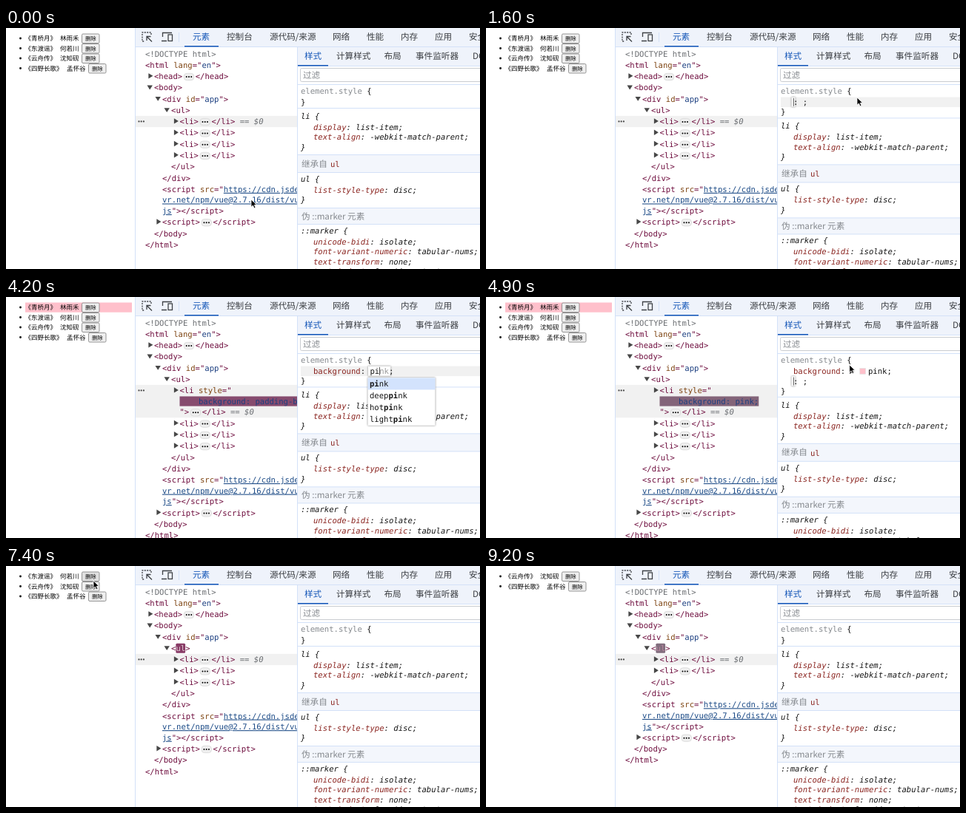
An HTML page for the animation above (9.3 s loop, 640 by 326 pixels).

```html
<!DOCTYPE html>
<html lang="zh">
<head>
<meta charset="utf-8">
<title>List deletion in the inspector</title>
<style>
  html, body { margin: 0; width: 100%; height: 100%; overflow: hidden; background: #fff; }
  svg { display: block; width: 640px; height: 326px; }
  text { white-space: pre; fill: #161616; text-rendering: geometricPrecision;
         font: 10.58px "DejaVu Sans Mono", monospace; }
  .ui { font: 11.6px "Noto Sans CJK SC", "Noto Sans CJK", sans-serif; fill: #3a3d41; }
  .page { font: 8.5px "Noto Sans CJK SC", "Noto Sans CJK", sans-serif; fill: #000; }
  .btn { font-size: 7.4px; }
  .blue { fill: #1557b8; }
  .muted { fill: #85898e; }
  .tag { fill: #6d0b3c; }
  .attr { fill: #7d4310; }
  .val { fill: #1c3f80; }
  .link { fill: #1b4a86; text-decoration: underline; }
  .doc { fill: #6a6d71; }
  .prop { fill: #8b2520; }
  .ghost { fill: #9a9a9a; }
  .it { font-style: italic; }
  .bold { font-weight: bold; }
  .rule { stroke: #d3e1f8; }
  .bar { fill: #f3f6fc; }
  .box { fill: #fff; filter: drop-shadow(0 0 1px #777); }
  .band { fill: #f1f1f1; }
</style>
</head>
<body>
<svg viewBox="0 0 640 326" xml:space="preserve">
  <defs>
    <clipPath id="left"><rect x="175" y="26" width="218" height="300"/></clipPath>
    <clipPath id="right"><rect x="394" y="76" width="246" height="250"/></clipPath>
  </defs>
  <g id="page"></g>
  <g id="tree" clip-path="url(#left)"></g>
  <g id="styles" clip-path="url(#right)"></g>
  <g id="chrome"></g>
  <g id="popup"></g>
  <path id="pointer" d="M0 0V10.2L2.4 8L4.1 11.8L5.9 11L4.3 7.3H7.5Z" fill="#000" stroke="#fff" stroke-width=".8"/>
</svg>
<script>
const LOOP = 9300, STEP = 100, CW = 6.37, ROW = 15.27, WRAP = 14.6;
const DELETES = [7100, 8500];
const books = [['青桥月', '林雨禾'], ['东渡谣', '何若川'], ['云舟传', '沈知砚'], ['四野长歌', '孟怀谷']];
const nameHints = ['backdrop-filter', 'backface-visibility', 'background',
  ...['attachment', 'blend-mode', 'clip', 'color', 'image', 'origin', 'position',
    'position-x', 'position-y', 'repeat', 'size'].map(s => 'background-' + s)];
const pHints = ['padding-box', 'palegoldenrod', 'palegreen', 'paleturquoise', 'palevioletred',
  'papayawhip', 'peachpuff', 'peru', 'pink', 'plum', 'powderblue', 'purple'];
const pinkHints = ['pink', 'deeppink', 'hotpink', 'lightpink'];

const $ = id => document.getElementById(id);
const esc = s => s.replace(/&/g, '&amp;').replace(/</g, '&lt;');
const span = (c, s) => `<tspan class="${c}">${esc(s)}</tspan>`;
// y is the visual middle of the line
const text = (x, y, body, c = '', d = 3.8) => `<text x="${x}" y="${y + d}" class="${c}">${body}</text>`;
const ui = (x, y, s, c = '') => text(x, y, s, 'ui ' + c, 4.3);
const rect = (x, y, w, h, rest) => `<rect x="${x}" y="${y}" width="${w}" height="${h}" ${rest}/>`;
const line = (x1, y1, x2, y2) => `<path class="rule" d="M${x1} ${y1}L${x2} ${y2}"/>`;
const mix = (a, b, p) => a.map((v, i) => Math.round(v + (b[i] - v) * p));
const latest = (t, steps) => steps.reduce((cur, [at, v]) => t >= at ? v : cur, '');

function drawChrome() {
  let out = rect(175, 0, 465, 25, 'fill="#eff3fb"') + rect(394, 25, 246, 26, 'fill="#eff3fb"')
    + rect(394, 51, 246, 25, 'fill="#fff"')
    + line(175, 25.5, 640, 25.5) + line(394, 51.5, 640, 51.5) + line(394, 76.5, 640, 76.5)
    + line(174.5, 0, 174.5, 326) + line(393.5, 25, 393.5, 326) + line(233.5, 6, 233.5, 19)
    + rect(241, 24, 46, 1.5, 'fill="#1557b8"') + rect(394, 50, 41, 1.5, 'fill="#1557b8"')
    + rect(397.5, 54.5, 260, 18, 'rx="2" fill="#fff" stroke="#c9ccd1"') + ui(401, 63.5, '过滤', 'muted');
  [[252, '元素', 'blue'], [298, '控制台'], [356, '源代码/来源'], [441, '网络'], [487, '性能'],
    [533, '内存'], [579, '应用'], [625, '安全']].forEach(([x, s, c]) => out += ui(x, 12, s, c));
  [[403, '样式', 'blue'], [446, '计算样式'], [510.5, '布局'], [553, '事件监听器'], [630, 'DOM 断点']]
    .forEach(([x, s, c]) => out += ui(x, 38, s, c));
  out += `<g fill="none" stroke="#3f4246" stroke-width="1.3">
    <path d="M196 9V6H184V18H187" stroke-dasharray="2 1.4"/>
    <path d="M197 18.5L190.5 12M190 17V11.5H195.5"/>
    <path d="M211.5 12V6.5H224M210 17.5H217"/><rect x="219" y="9" width="5.5" height="8.5"/></g>`;
  $('chrome').innerHTML = out;
}

function pointerAt(t) {
  const keys = t < 3000
    ? [[0, 331, 232], [500, 331, 232], [900, 350, 165], [1300, 501, 94], [1900, 501, 94]]
    : [[4800, 501, 94], [5700, 201, 30], [5800, 201, 30], [6600, 118, 20], [8900, 118, 20]];
  const i = keys.findIndex(k => k[0] > t);
  if (i < 1) return null;
  const [a, b] = [keys[i - 1], keys[i]];
  let p = (t - a[0]) / (b[0] - a[0]);
  p = p * p * (3 - 2 * p);
  return { x: a[1] + (b[1] - a[1]) * p, y: a[2] + (b[2] - a[2]) * p };
}

// purple eases out to grey, then the grey fades away
function flash(age) {
  if (age < 0 || age >= 1400) return null;
  const p = 1 - (1 - Math.min(age / 1120, 1)) ** 2;
  return {
    bg: `rgb(${mix([142, 0, 75], [128, 128, 134], p)})`,
    ink: `rgb(${mix([255, 255, 255], [109, 11, 60], age / 1400)})`,
    alpha: age < 1120 ? 1 : (1400 - age) / 280
  };
}

function stateAt(t) {
  const gone = DELETES.filter(d => t >= d).length;
  return {
    t, gone, list: books.slice(gone), ptr: pointerAt(t),
    mode: latest(t, [[1400, 'name'], [3200, 'value'], [4900, 'done'], [DELETES[0], '']]),
    name: latest(t, [[2000, 'b'], [2300, 'ba'], [2600, 'bac'], [3000, 'back']]),
    value: latest(t, [[3800, 'p'], [4100, 'pi'], [4400, 'pin'], [4600, 'pink']]),
    style: gone ? '' : latest(t, [[3800, 'padding-box'], [4300, 'pink']]),
    pink: t >= 4100 && !gone,
    ulFlash: gone ? flash(t - DELETES[gone - 1]) : null,
    styleFlash: flash(t - (t < 4300 ? 3800 : 4300))
  };
}

function page(st, hoverItem) {
  return st.list.map(([title, author], i) => {
    const y = 14 + i * 13.5, dx = (title.length - 3) * 9, bx = 102.5 + dx;
    const p = st.ptr, over = p && Math.abs(p.x - bx - 11.5) < 12 && Math.abs(p.y - y) < 6.6;
    return (st.pink && !i ? rect(26, y - 6.5, 144, 13.2, 'fill="#ffc0cb"') : '')
      + `<circle cx="19.5" cy="${y}" r="1.4"/>`
      + text(25.5, y, `《${title}》`, 'page', 3.1) + text(73 + dx, y, author, 'page', 3.1)
      + rect(bx, y - 6, 23.5, 12.5, `rx="1.5" fill="${over ? '#e0e0e0' : '#efefef'}" stroke="#7b7b7b" stroke-width=".8"`)
      + text(bx + 4.4, y + .2, '删除', 'page btn', 2.8)
      + (i === hoverItem ? rect(26, y - 6.5, 144, 13.2, 'fill="#6fa8dc" opacity=".66"') : '');
  }).join('');
}

function tree(st) {
  let y = 34.8, out = '', hoverItem = -1;
  const tag = s => span('tag', s);
  const arrow = (x, open) => `<path fill="#474747" d="${open
    ? `M${x - 9.5} ${y - 3}h7.4l-3.7 5.8z` : `M${x - 7.6} ${y - 4.2}v7.4l6-3.7z`}"/>`;
  const folded = (x, head, n, end) => {
    const px = x + n * CW + 2;
    return text(x, y, head) + rect(px, y - 4, 13.5, 9.4, 'rx="4" fill="#efefef" stroke="#d8d8d8" stroke-width=".8"')
      + [3.5, 6.75, 10].map(d => `<circle cx="${px + d}" cy="${y + .7}" r="1"/>`).join('')
      + text(px + 15.5, y, end);
  };
  const row = (body, lines = 1, item = -1) => {
    const h = ROW + (lines - 1) * WRAP, p = st.ptr;
    if (p && st.t >= 500 && p.x > 176 && p.x < 393 && p.y > 26 && p.y >= y - 8 && p.y < y - 8 + h) {
      hoverItem = item;
      if (item) out += rect(180, y - 7.6, 220, h, 'rx="5" class="band"');
    }
    out += body;
    y += ROW;
  };

  row(text(188, y, '&lt;!DOCTYPE html>', 'doc'));
  row(text(188, y, tag('<html ') + span('attr', 'lang') + tag('="') + span('val', 'en') + tag('">')));
  row(arrow(200, false) + folded(200, tag('<head>'), 6, tag('</head>')));
  row(arrow(200, true) + text(200, y, tag('<body>')));
  row(arrow(211, true) + text(211, y, tag('<div ') + span('attr', 'id') + tag('="') + span('val', 'app') + tag('">')));

  const f = st.ulFlash;
  row(arrow(223, true) + (f ? rect(223 + CW, y - 6.5, 2 * CW, 13, `rx="1.5" fill="${f.bg}" opacity="${f.alpha}"`) : '')
    + text(223, y, tag('<') + (f ? `<tspan fill="${f.ink}">ul</tspan>` : tag('ul')) + tag('>')));

  st.list.forEach((_, i) => {
    const x = 234.5, end = tag('</li>') + (i ? '' : span('doc it', ' == $0'));
    if (!i) out += rect(175, y - 7.6, 219, ROW + (st.style ? 2 * WRAP : 0), 'class="band"')
      + [179.5, 182.7, 185.9].map(cx => `<circle cx="${cx}" cy="${y}" r="1.1" fill="#474747"/>`).join('');
    if (i || !st.style) return row(arrow(x, false) + folded(x, tag('<li>'), 4, end), 1, i);
    row(arrow(x, false) + text(x, y, tag('<li ') + span('attr', 'style') + tag('="')), 3, i);
    y += WRAP - ROW;
    const css = `background: ${st.style};`, g = st.styleFlash;
    if (g) out += rect(x, y - 6.6, (css.length + 4) * CW, 13.2, `fill="${g.bg}" opacity="${g.alpha}"`);
    out += text(x + 4 * CW, y, css, 'val');
    y += WRAP;
    out += folded(x, tag('">'), 2, end);
    y += ROW;
  });

  row(text(223, y, tag('</ul>')));
  row(text(211, y, tag('</div>')));
  row(text(211, y, tag('<script ') + span('attr', 'src') + tag('="') + span('link', 'https://cdn.jsdeli'))
    + text(211, y + WRAP, span('link', 'vr.net/npm/vue@2.7.16/dist/vue.'))
    + text(211, y + 2 * WRAP, span('link', 'js') + tag('"></' + 'script>')), 3);
  y += 2 * WRAP;
  row(arrow(211, false) + folded(211, tag('<script>'), 8, tag('</' + 'script>')));
  row(text(200, y, tag('</body>')));
  row(text(188, y, tag('</html>')));
  return { out, hoverItem };
}

function editor(x, y, typed, hint, tail) {
  const n = Math.max(typed.length, hint.length), cx = x + typed.length * CW + .3;
  return rect(x - 2.5, y - 6.8, n * CW + 5, 13.2, 'class="box"')
    + text(x, y, typed + span('ghost', hint.slice(typed.length)) + tail)
    + `<path d="M${cx} ${y - 5.5}v11" stroke="#222" stroke-width=".8"/>`;
}

function styles(st) {
  const { mode } = st;
  const extra = { name: 1, value: 1, done: 2 }[mode] || 0, dy = extra * 13.4;
  const prop = span('prop', 'background') + ':';
  const band = rect(398, 93.5, 242, 13.6, 'class="band"');
  let out = text(398, 85, span('muted', 'element.style') + ' {') + text(398, 100 + dy, '}');
  if (mode === 'name') {
    out += band + editor(415, 100.3, st.name, st.name && 'background', ': ;');
  } else if (mode === 'value') {
    const hint = st.value === 'p' ? 'padding-box' : st.value && 'pink';
    out += band + text(415, 100.3, prop) + editor(491.4, 100.3, st.value, hint, ';');
  } else if (mode === 'done') {
    out += text(415, 100.3, prop) + text(516, 100.3, 'pink;')
      + '<path d="M491 96.8v7.4l6-3.7z" fill="#474747"/>'
      + rect(504.8, 96.6, 7.6, 7.6, 'fill="#ffc0cb" stroke="#ddd" stroke-width=".6"')
      + editor(415, 114, '', '', ': ;');
  }
  const rule = (y, sel, decls) => {
    out += text(398, y, sel + ' {', 'it');
    decls.forEach(([k, v], i) => out += text(415, y + 15 + i * 13.5, span('prop', k) + `: ${v};`, 'it'));
    out += text(398, y + 15 + decls.length * 13.5, '}', 'it');
  };
  const bar = (y, h) => rect(394, y, 246, h, 'class="bar"') + line(394, y, 640, y) + line(394, y + h, 640, y + h);
  out += `<g transform="translate(0 ${dy})">` + line(394, 108.5, 640, 108.5);
  rule(119, 'li', [['display', 'list-item'], ['text-align', '-webkit-match-parent']]);
  out += bar(171.5, 24) + ui(399, 183.4, '继承自', 'muted') + text(438, 184, 'ul', 'prop');
  rule(204, 'ul', [['list-style-type', 'disc']]);
  out += bar(243.5, 22) + ui(399, 254.3, '伪 ::marker 元素', 'muted');
  rule(274, '::marker', [['unicode-bidi', 'isolate'], ['font-variant-numeric', 'tabular-nums'],
    ['text-transform', 'none'], ['text-indent', '0px !important']]);
  return out + '</g>';
}

function popup({ mode, name, value }) {
  const named = mode === 'name', typed = named ? name : mode === 'value' ? value : '';
  if (!typed) return '';
  const hints = named ? nameHints : typed === 'p' ? pHints : pinkHints;
  const x = named ? 411.5 : 488.5, w = named ? 235 : 91;
  return rect(x, 109, w, hints.length * 15.95 + 1, 'class="box"') + hints.map((s, i) => {
    const y = 117.4 + i * 15.95, at = s.indexOf(typed);
    return (i === (named ? 2 : 0) ? rect(x, y - 8, w, 16, 'fill="#d3e3fd"') : '')
      + text(x + 2.5, y, s.slice(0, at) + span('bold', typed) + s.slice(at + typed.length));
  }).join('');
}

const shown = {};
function put(id, html) {
  if (shown[id] !== html) $(id).innerHTML = shown[id] = html;
}

function frame() {
  const t = Math.floor(performance.now() % LOOP / STEP) * STEP;
  const st = stateAt(t), dom = tree(st), p = st.ptr;
  put('tree', dom.out);
  put('page', page(st, dom.hoverItem));
  put('styles', styles(st));
  put('popup', popup(st));
  $('pointer').setAttribute('visibility', p ? 'visible' : 'hidden');
  if (p) $('pointer').setAttribute('transform', `translate(${p.x} ${p.y})`);
  requestAnimationFrame(frame);
}

drawChrome();
frame();
</script>
</body>
</html>
```
